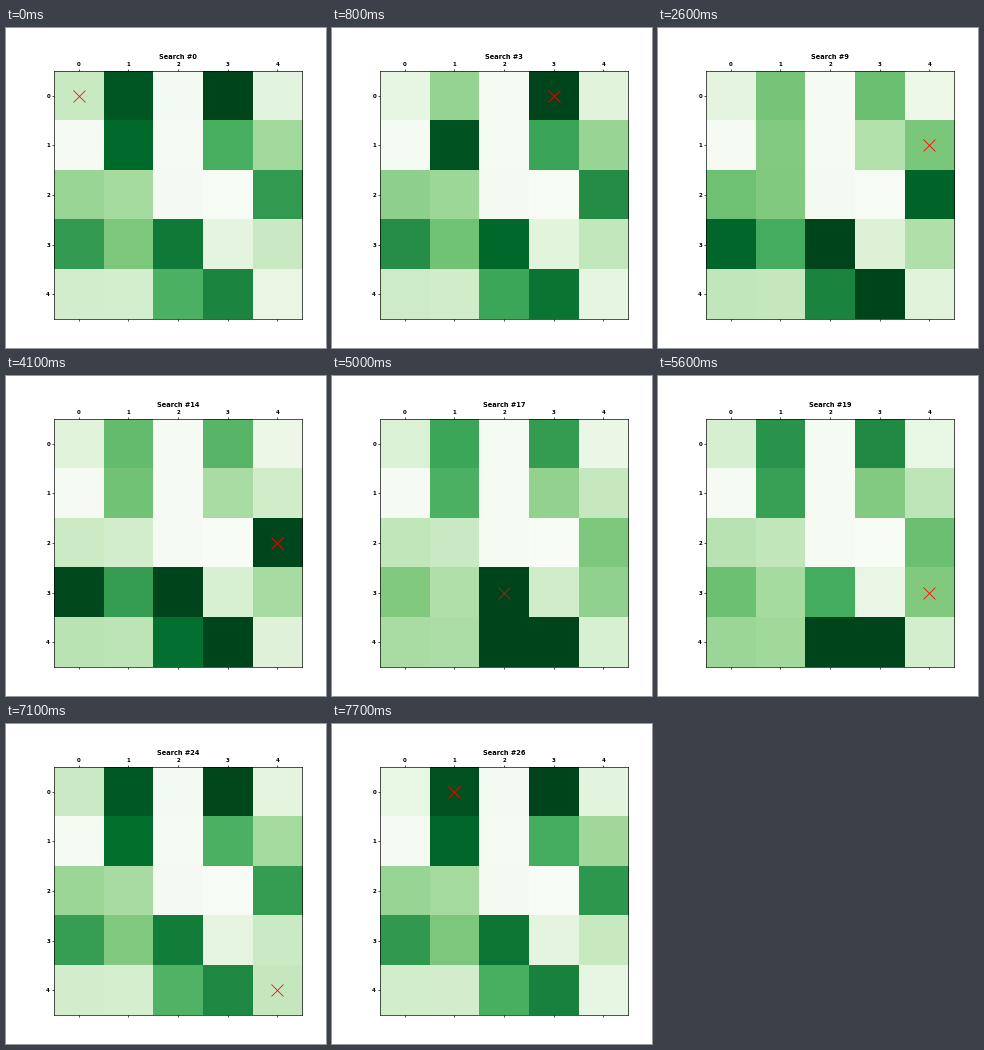
These frames come from a looping animation (320 px wide and 320 px high, 8000 ms). A matplotlib script:

```python
import numpy as np
import matplotlib.pyplot as plt
from matplotlib.animation import FuncAnimation

plt.rcParams.update({"font.weight": "bold", "axes.titleweight": "bold",
                     "axes.linewidth": 1.2})

SIZE = 5
DETECTION = 0.6   # chance of finding the object when its cell is searched
INTERVAL = 100
FRAMES = 80

prior = np.array([
    [0.245, 0.945, 0.025, 1.000, 0.130],
    [0.015, 0.880, 0.015, 0.608, 0.370],
    [0.395, 0.358, 0.020, 0.005, 0.690],
    [0.685, 0.473, 0.820, 0.125, 0.246],
    [0.205, 0.198, 0.598, 0.775, 0.105],
])


def belief(search):
    """Probability map just before the given search, in raster order."""
    p = prior.copy()
    for i in range(search):
        p.flat[i % p.size] *= 1 - DETECTION
    return p * prior.sum() / p.sum()


def search_at(frame):
    return 0 if frame < 2 else 1 + (frame - 2) // 3


fig = plt.figure(figsize=(8, 8), dpi=40, facecolor="white")
ax = fig.add_axes([48 / 320, 28.8 / 320, 248.2 / 320, 248.2 / 320])
image = ax.imshow(prior, cmap="Greens", vmin=0, vmax=1,
                  interpolation="nearest")
cross, = ax.plot([0], [0], "x", color="red", markersize=21,
                 markeredgewidth=1.4)
ax.set(xlim=(-0.5, SIZE - 0.5), ylim=(SIZE - 0.5, -0.5),
       xticks=range(SIZE), yticks=range(SIZE))
ax.tick_params(axis="x", top=True, bottom=True,
               labeltop=True, labelbottom=False)
ax.tick_params(width=1.2)
title = ax.set_title("Search #0", fontsize=12)


def update(frame):
    search = search_at(frame)
    row, col = divmod(search % SIZE**2, SIZE)
    image.set_data(belief(search))
    cross.set_data([col], [row])
    title.set_text(f"Search #{search}")
    return image, cross, title


anim = FuncAnimation(fig, update, frames=FRAMES, interval=INTERVAL,
                     repeat=True, repeat_delay=0, blit=False)
plt.show()
```
